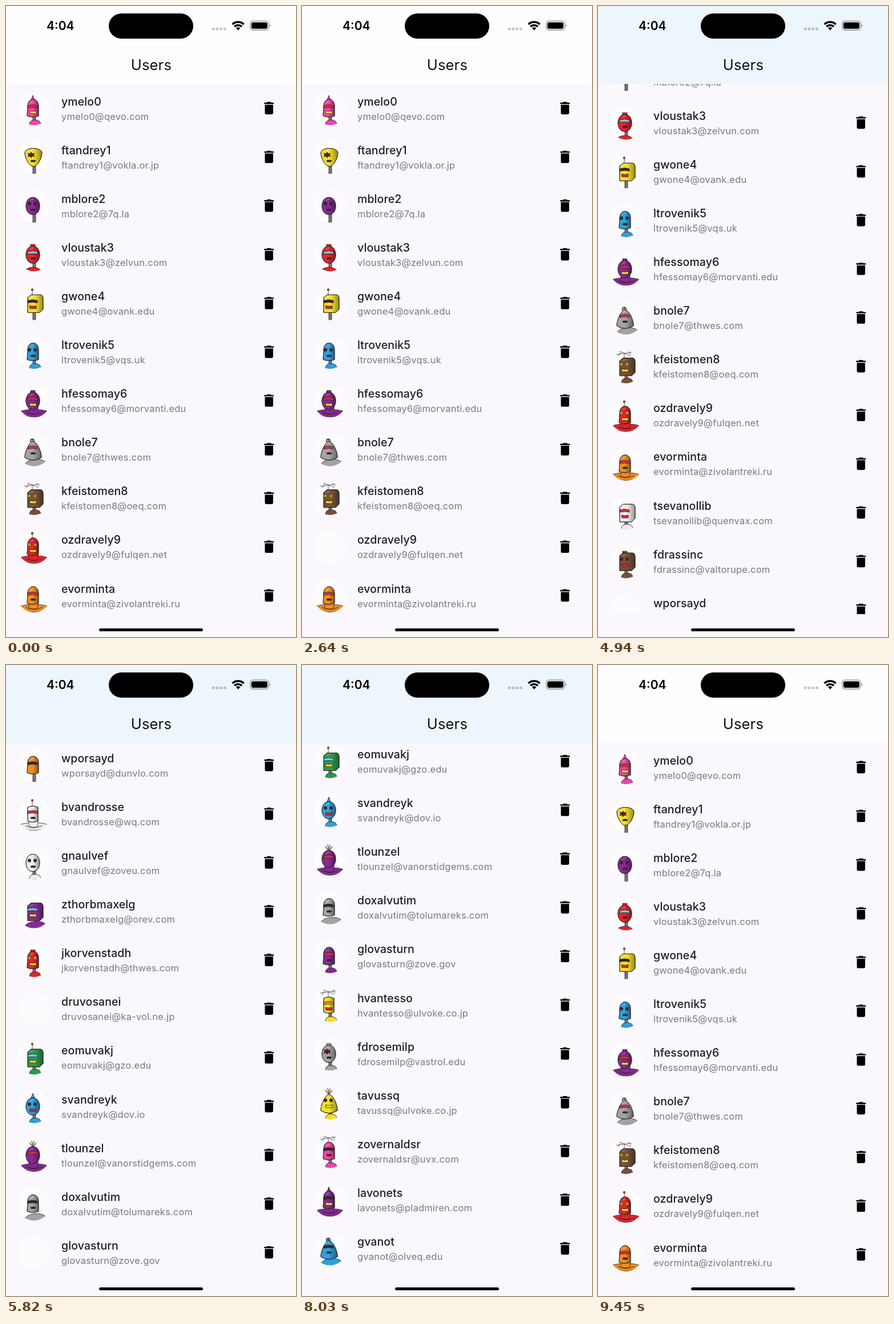
An HTML page for the animation above (9.64 s loop, 508 by 1102 pixels).

```html
<!DOCTYPE html>
<html lang="en">
<head>
<meta charset="utf-8">
<title>Users</title>
<style>
html, body { margin: 0; width: 100%; height: 100%; overflow: hidden; background: #faf8fc; }
svg { display: block; width: 100vw; height: 100vh; font-family: Inter, Roboto, sans-serif; }
.name { font-size: 19.5px; font-weight: 500; letter-spacing: .1px; fill: #1f1d21; }
.mail { font-size: 16.5px; letter-spacing: .2px; fill: #7b797d; }
.bot { stroke: #2a2226; stroke-width: .8; stroke-linejoin: round; }
</style>
</head>
<body>
<svg viewBox="0 0 508 1102">
  <defs>
    <clipPath id="view"><rect y="136" width="508" height="926"/></clipPath>
    <clipPath id="round"><circle r="29"/></clipPath>
    <linearGradient id="shade">
      <stop offset=".5" stop-opacity="0"/><stop offset="1" stop-opacity=".38"/>
    </linearGradient>
    <path id="bin" transform="translate(460.7 -.6) scale(1.2) translate(-12 -12)" d="M6 19c0 1.1.9 2 2 2h8c1.1 0 2-.9 2-2V7H6zM19 4h-3.5l-1-1h-5l-1 1H5v2h14z"/>
  </defs>
  <rect width="508" height="1102" fill="#faf8fc"/>
  <g clip-path="url(#view)"><g id="list"></g></g>
  <path id="spin" fill="none" stroke="#2196f3" stroke-width="5.2" stroke-linecap="square"/>
  <rect width="508" height="136" fill="#fefdff"/>
  <rect id="tint" width="508" height="136" fill="#edf5fd"/>
  <text x="254.4" y="112" text-anchor="middle" font-size="25.5" letter-spacing=".2" fill="#111">Users</text>
  <text x="95.3" y="42" text-anchor="middle" font-size="21" font-weight="600">4:04</text>
  <rect x="180" y="13" width="148" height="44" rx="22"/>
  <g fill="#000" fill-opacity=".22">
    <circle cx="363.4" cy="40" r="2.5"/><circle cx="370" cy="40" r="2.5"/>
    <circle cx="376.7" cy="40" r="2.5"/><circle cx="383.4" cy="40" r="2.5"/>
  </g>
  <path d="M396.6 32a14.6 14.6 0 0 1 20 0M400.2 36a9.2 9.2 0 0 1 12.8 0" fill="none" stroke="#000" stroke-width="3.5"/>
  <path d="M406.6 42.6l-3.8-4a5.4 5.4 0 0 1 7.6 0z"/>
  <rect x="427.6" y="26.2" width="32.6" height="15.8" rx="5" fill="none" stroke="#000" stroke-opacity=".42" stroke-width="1.3"/>
  <rect x="429.8" y="28.4" width="28.2" height="11.4" rx="3"/>
  <path d="M461.8 31.5q3 2.6 0 5.2z" fill-opacity=".45"/>
  <rect x="163" y="1087" width="182" height="5" rx="2.5"/>
</svg>
<script>
const LOOP = 9640, PITCH = 85.1, STOP = 1110, END = 1626;
const $ = id => document.getElementById(id);

// handle, domain, then a look code: colour, head, base, eyes, mouth, top
const users = `ymelo0 qevo.com kcsvys
ftandrey1 vokla.or.jp ytnqd-
mblore2 7q.la prned-
vloustak3 zelvun.com rrgadc
gwone4 ovank.edu ybndra
ltrovenik5 vqs.uk bcsed-
hfessomay6 morvanti.edu provyc
bnole7 thwes.com gphvdb
kfeistomen8 oeq.com nbsyyx
ozdravely9 fulqen.net rcoyya
evorminta zivolantreki.ru ocovd-
tsevanollib quenvax.com wbsvr-
fdrassinc valtorupe.com nbserc
wporsayd dunvlo.com ocnd--
bvandrosse wq.com wyovda
gnaulvef zoveu.com wrsed-
zthorbmaxelg orev.com pbhay-
jkorvenstadh thwes.com rcsyyc
druvosanei ka-vol.ne.jp gcsed-
eomuvakj gzo.edu ebsaya
svandreyk dov.io brsers
tlounzel vanorstidgems.com prov-t
doxalvutim tolumareks.com gchdd-
glovasturn zove.gov pcsvd-
hvantesso ulvoke.co.jp yysorx
fdrosemilp vastrol.edu grsqdc
tavussq ulvoke.co.jp ypseyt
zovernaldsr uvx.com kcsddx
lavonets pladmiren.com pcodys
gvanot olveq.edu bphddb`.split('\n').map(s => s.split(' '));

const paint = { k: '#ef46a8', y: '#f2df2c', p: '#862b92', r: '#e3242b', b: '#2f9fdb',
  g: '#a3a3a5', n: '#78503a', o: '#ee8d22', w: '#ededee', e: '#2c9a4a', d: '#33262a', a: '#6fd3ee' };

const heads = {
  c: 'M-12 13L-11-4C-11-20 8-20 8-4V13Q-2 17-12 13Z',
  r: 'M-2-15C14-15 14 15-2 15S-18-15-2-15Z',
  b: 'M-11-10L-5-15H12Q16-14 16-9V10L10 16H-11Z',
  t: 'M-16-8C-14-18 12-18 14-8C14 2 6 16-1 16S-16 2-16-8Z',
  p: 'M-2-14C6-14 14 6 13 14Q-2 23-16 14C-17 6-8-14-2-14Z',
  y: 'M-11-12Q-2-16 7-12V12Q-2 16-11 12Z'
};

const path = (d, fill, extra = '') => `<path d="${d}" fill="${fill}" ${extra}/>`;
const neck = path('M-2 13H3V30H-2Z', '#77757a');
const bases = {
  n: () => neck,
  s: c => neck + path('M-8 30Q-9 20 2 20T12 30Z', c),
  g: c => neck + path('M-18 31Q-14 22-2 22T15 31Z', c),
  o: c => path('M-23 18C-12 14 12 14 23 18C18 32-18 32-23 18Z', c) +
    path('M-15 20Q0 28 15 20', 'none') + path('M-9 10H7V21Q-1 25-9 21Z', c),
  h: c => path('M-20 31Q-14 18 2 17T24 26V31Z', c)
};

const pair = (fill, dot) => [-8, 2].map(x =>
  `<circle cx="${x}" cy="-4" r="2.7" fill="${fill}"/><circle cx="${x}" cy="-4" r=".6" fill="${dot}"/>`).join('');
const visor = fill => path('M-11-5Q-2-8 6-5V-1Q-2-3-11-1Z', fill);
const eyes = {
  e: () => pair('#4a2b35', '#111'),
  y: () => pair('#f5dc36', '#111'),
  q: () => path('M-5-9l2 3 4-1-2 3 2 3-4-1-2 3-2-3-4 1 2-3-2-3 4 1z', '#5c1720'),
  v: () => visor('#d6333a'), a: () => visor(paint.a),
  d: () => visor(paint.d), o: () => visor(paint.o)
};
const mouth = k => k === '-' ? '' : k === 'd'
  ? path('M-6 6Q-2 4 3 6L2 8H-5Z', paint.d)
  : path('M-8 4Q-2 6 4 4V9H-7Z', paint[k]);

const tops = {
  s: c => path('M-5-15L-2-23 1-15Z', c),
  a: () => path('M-3-14V-24', 'none') + '<circle cx="-3" cy="-24" r="1.7" fill="#d33"/>',
  x: () => path('M-3-13V-24M-17-21L10-25M-12-27L8-19M-14-18L-9-25M4-27L9-21', 'none', 'stroke="#4a3434"'),
  t: () => path('M-2-14L-8-22M-2-14L-4-25M-2-14L0-25M-2-14L4-22', 'none', 'stroke="#766056" stroke-width="1.5"'),
  b: c => `<circle cx="-3" cy="-15" r="4" fill="${c}"/><circle cx="-3" cy="-17" r="1" fill="#d33"/>`,
  c: c => path('M-6-13V-18H2V-13Z', c)
};

function robot([color, head, base, eye, lips, top]) {
  const c = paint[color];
  return bases[base](c) + (top === '-' ? '' : tops[top](c)) +
    path(heads[head], c) + path(heads[head], 'url(#shade)') +
    path('M-7-9Q-5-12-1-12', 'none', 'stroke="#fff" stroke-opacity=".55"') +
    eyes[eye]() + mouth(lips);
}

$('list').innerHTML = users.map(([name, host, look], i) =>
  `<g transform="translate(0 ${179 + i * PITCH})">
    <g transform="translate(49 0)"><circle r="29" fill="#fcfbfd"/>
      <g clip-path="url(#round)"><g class="bot">${robot(look)}</g></g></g>
    <text class="name" x="97" y="-5.5">${name}</text>
    <text class="mail" x="97" y="19.5">${name}@${host}</text>
    <use href="#bin"/></g>`).join('');
const bots = [...document.querySelectorAll('.bot')];

// when each avatar finishes loading
function loadTime(i) {
  if (i === 9) return 2700;
  if (i === 18) return 6000;
  if (i === 23) return 6240;
  if (i < 11) return 2330 + (i * 7 % 11) * 25;
  if (i < 13) return 4700;
  return i < 23 ? 5100 + (i - 13) * 75 : 7800;
}

const clamp = u => Math.min(1, Math.max(0, u));
const span = (t, a, b) => clamp((t - a) / (b - a));

function scrollAt(t) {
  if (t >= 9090) return 0;
  if (t < 4940) return 227 * span(t, 4700, 4940) ** 2.5;
  if (t < 7730) return STOP - (STOP - 227) * (1 - span(t, 4940, 5520)) ** 2;
  if (t < 8030) {
    const u = span(t, 7730, 8030);
    return STOP + (END - STOP) * (2.15 * u * u - 1.15 * u ** 3);
  }
  const s = t - 8030; // spring back from the end of the list
  return t < 8450 ? END + 1.4 * s * Math.exp(-s / 70) : END;
}

// cubic-bezier(.4, 0, .2, 1)
function ease(x) {
  let lo = 0, hi = 1;
  for (let k = 0; k < 20; k++) {
    const m = (lo + hi) / 2, n = 1 - m;
    if (1.2 * n * n * m + .6 * n * m * m + m ** 3 < x) lo = m; else hi = m;
  }
  return lo * lo * (3 - 2 * lo);
}

function spinner(t) {
  const p = t / 1333 % 1, turn = 1.5 * Math.PI;
  const head = ease(clamp(p * 2)) * turn, tail = ease(clamp(p * 2 - 1)) * turn;
  const a = -Math.PI / 2 + tail + t / 2222 * 2 * Math.PI + p * Math.PI / 2;
  const sweep = Math.max(head - tail, .01);
  const at = v => `${(254 + 23.4 * Math.cos(v)).toFixed(2)} ${(600.5 + 23.4 * Math.sin(v)).toFixed(2)}`;
  return `M${at(a)}A23.4 23.4 0 ${+(sweep > Math.PI)} 1 ${at(a + sweep)}`;
}

function draw(t) {
  const busy = t >= 60 && t < 2300;
  $('list').style.display = busy ? 'none' : '';
  $('list').setAttribute('transform', `translate(0 ${-scrollAt(t).toFixed(2)})`);
  bots.forEach((b, i) => b.style.display = t < 60 || t >= loadTime(i) ? '' : 'none');
  $('spin').setAttribute('d', busy && t >= 360 ? spinner(t - 360) : '');
  $('tint').setAttribute('opacity', t < 9090 ? span(t, 4690, 4890) : 0);
}

const start = performance.now();
function tick(now) {
  draw(Math.max(0, now - start) % LOOP);
  requestAnimationFrame(tick);
}
draw(0);
requestAnimationFrame(tick);
</script>
</body>
</html>
```
